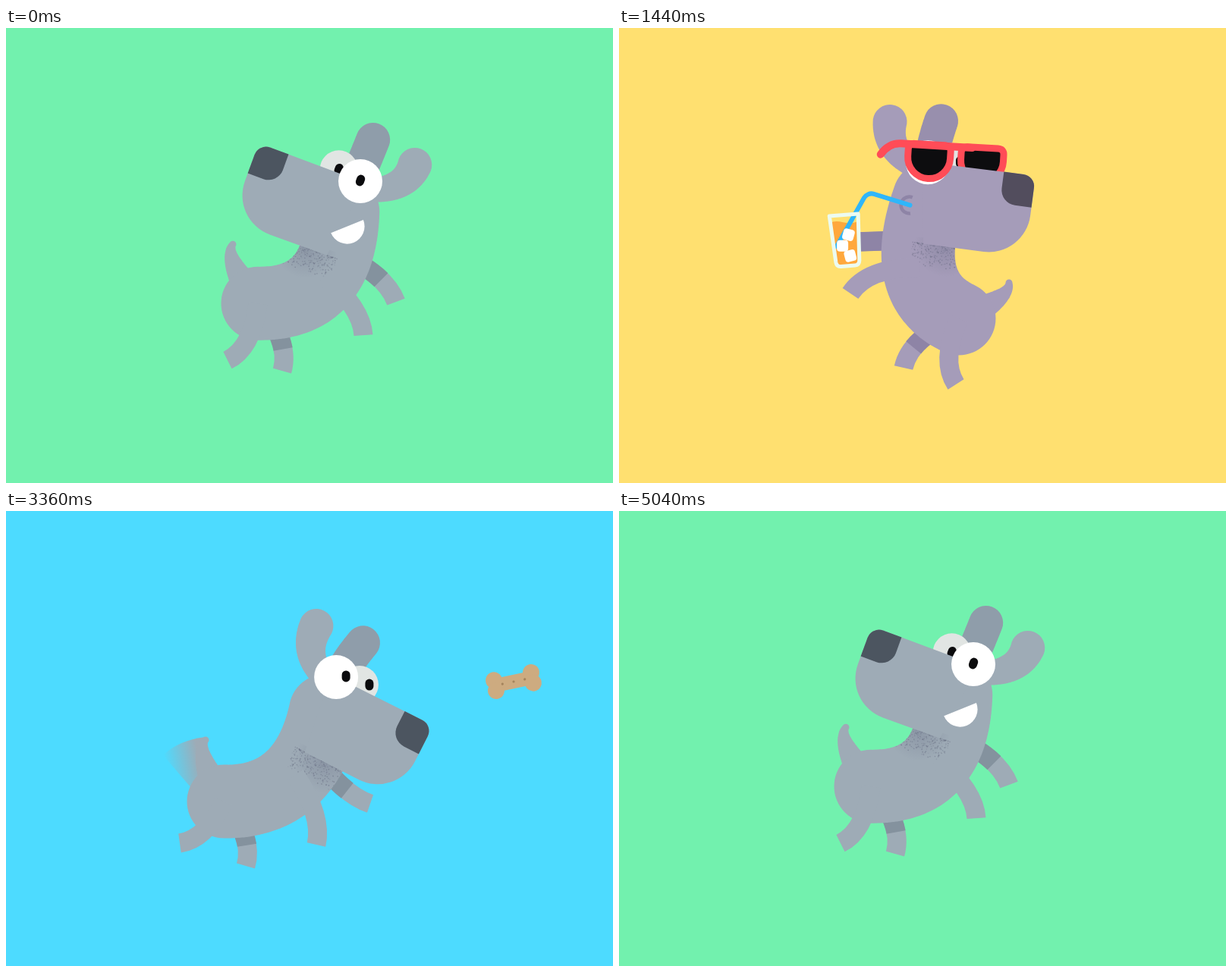
These frames come from a looping animation (800x600 px, 5080 ms). An HTML page with a canvas:

```html
<!DOCTYPE html>
<html lang="en">
<head>
<meta charset="utf-8">
<title>Jumping dogs</title>
<style>
html, body { margin: 0; width: 100%; height: 100%; overflow: hidden; }
canvas { display: block; width: 100vw; height: 100vh; }
</style>
</head>
<body>
<canvas id="stage" width="800" height="600"></canvas>
<script>
const ctx = document.getElementById('stage').getContext('2d');
const LOOP = 5080, STEP = 40, RAD = Math.PI / 180;

// A pose is a nose corner with head tilt, two spine points, a tail tip,
// ear angles, four feet and the bend of the front legs. The rest follows.
const hang = {
  head: [558, 209, 23.5], bend: [350, 295], rump: [398, 382], tail: [486, 377], ears: [-42, 35],
  nearFront: [294, 317], farFront: [313, 245], nearHind: [393, 471], farHind: [328, 445], curl: [.25, 0]
};
const sip = {
  head: [549, 195, 7.5], bend: [366, 345], rump: [448, 383], tail: [514, 336], ears: [-29, 9],
  nearFront: [305, 350], farFront: [314, 282], nearHind: [444, 470], farHind: [375, 448], curl: [.25, 0]
};
const smile = {
  head: [467, 152, -20], bend: [360, 365], rump: [468, 363], tail: [501, 285], ears: [-33, 0],
  nearFront: [329, 405], farFront: [286, 361], nearHind: [508, 438], farHind: [436, 452], curl: [.2, .2]
};
const bored = {
  head: [497, 180, 1.5], bend: [384, 340], rump: [304, 424], tail: [218, 385], ears: [-45, 39],
  nearFront: [443, 368], farFront: [440, 340], nearHind: [289, 512], farHind: [327, 498], curl: [0, .25]
};
const chase = {
  head: [563, 283, 27], bend: [395, 385], rump: [287, 383], tail: [263, 302], ears: [-26, 10],
  nearFront: [409, 440], farFront: [480, 386], nearHind: [229, 438], farHind: [316, 468], curl: [.2, -.15]
};

const purple = { skin: '#a59cb9', dark: '#8e84a6', ear: '#988fad', nose: '#524d5d', rgb: '165,156,185' };
const grey = { skin: '#9eabb6', dark: '#84929e', ear: '#8f9daa', nose: '#4c5560', rgb: '158,171,182' };

// zero: clock time of the top of the jump; show and t0 are seconds from there.
const yellow = { bg: '#ffe070', paint: purple, from: hang, to: sip, zero: 880, show: 0, t0: 0, span: .56,
                 face: -1, cool: true };
const blue = { bg: '#4ddbff', paint: grey, from: bored, to: chase, zero: 2560, show: -.04, t0: 0, span: .8,
               face: 1, rise: 31, bone: true };
const green = { bg: '#72f1ae', paint: grey, from: hang, to: smile, zero: 4200, show: .04, t0: .04, span: .8,
                face: -1, shift: -15, flip: true };
yellow.next = blue; blue.next = green; green.next = yellow;

const clamp = (v, a = 0, b = 1) => Math.max(a, Math.min(b, v));
const mix = (a, b, f) => a.map((v, i) => v + (b[i] - v) * f);
const quad = (a, c, b, s) => mix(mix(a, c, s), mix(c, b, s), s);

let seed = 7;
const rand = () => (seed = seed * 16807 % 2147483647) / 2147483647;
const grain = Array.from({ length: 260 }, () =>
  [-80 - 70 * rand(), 107 + 30 * rand() ** 2, .08 + .3 * rand()]);

function blend(scene, t) {
  const u = Math.max(0, (t - scene.t0) / scene.span);
  const f = u < 1 ? u ** 1.5 : 1 + .5 * (1 - u ** -3);
  const pose = { f };
  for (const k in scene.to) pose[k] = mix(scene.from[k], scene.to[k], f);
  return pose;
}

function fill(color) { ctx.fillStyle = color; ctx.fill(); }
function line(color, width, cap = 'butt') {
  ctx.strokeStyle = color; ctx.lineWidth = width; ctx.lineCap = cap; ctx.lineJoin = 'round';
  ctx.stroke();
}
function disc(x, y, r, color) {
  ctx.beginPath(); ctx.arc(x, y, r, 0, 7); fill(color);
}
function place(x, y, deg, draw) {
  ctx.save(); ctx.translate(x, y); ctx.rotate(deg * RAD); draw(); ctx.restore();
}

// A soft limb along a curve whose radius is a function of the way along it.
function limb(a, c, b, radius) {
  const path = new Path2D();
  for (let i = 0; i <= 48; i++) {
    const [x, y] = quad(a, c, b, i / 48), r = radius(i / 48);
    path.moveTo(x + r, y);
    path.arc(x, y, r, 0, 2 * Math.PI);
  }
  return path;
}
function paintLimb(color, ...shape) {
  ctx.fillStyle = color;
  ctx.fill(limb(...shape));
}

// Point part of the way from a to b, pushed sideways.
function knee([ax, ay], [bx, by], along, side) {
  const dx = bx - ax, dy = by - ay;
  return [ax + dx * along + dy * side, ay + dy * along - dx * side];
}

function leg(hip, foot, side, paint, shade) {
  const c = knee(hip, foot, .65, side);
  ctx.beginPath(); ctx.moveTo(...hip); ctx.quadraticCurveTo(...c, ...foot);
  line(paint.skin, 25);
  if (!shade) return;
  ctx.beginPath(); ctx.moveTo(...hip);
  ctx.quadraticCurveTo(...mix(hip, c, shade), ...quad(hip, c, foot, shade));
  line(paint.dark, 25.5);
}

function tail(rump, tip, face, color) {
  paintLimb(color, rump, knee(rump, tip, .88, .215 * face), tip, s => 4.5 + 18 * (1 - s) ** 1.3);
}

function wag(rump, tip, t, paint) {
  const [x, y] = tip, [rx, ry] = rump;
  const g = ctx.createLinearGradient(x - 8, y + 30, x - 52, y + 38);
  g.addColorStop(0, paint.skin);
  g.addColorStop(1, `rgba(${paint.rgb},0)`);
  ctx.beginPath();
  ctx.moveTo(x, y - 4);
  ctx.quadraticCurveTo(x - 35, y, x - 56, y + 20);
  ctx.lineTo(rx - 43, ry - 18);
  ctx.lineTo(rx - 20, ry - 45);
  fill(g);
  place(rx, ry, -10 * (1 - Math.cos((t - .8) * 40)), () =>
    tail([0, 0], [x - rx, y - ry], 1, paint.skin));
}

function nearEar(deg, color) {
  const x = -172 + 57 * Math.sin(deg * RAD), y = 4 - 57 * Math.cos(deg * RAD);
  paintLimb(color, [-166, 5], [x, -12], [x, y], s => 16 + 6.5 * s);
}
function farEar(deg, color) {
  const x = -140 + 46 * Math.sin(deg * RAD), y = -10 - 46 * Math.cos(deg * RAD);
  paintLimb(color, [-138, -10], [-139, -24], [x, y], () => 22.5);
}

function eye(x, y, r, white, lidColor, look, lid, tilt) {
  disc(x, y, r, white);
  place(x + look[0], y + look[1], tilt, () => {
    ctx.beginPath(); ctx.roundRect(-5.5, -7.5, 11, 15, 5.5); fill('#0b0b0d');
  });
  if (lid <= 0) return;
  ctx.beginPath();
  ctx.arc(x, y, r + .4, (-98 - 88 * lid) * RAD, (-98 + 88 * lid) * RAD);
  fill(lidColor);
}

function lens(x) {
  ctx.beginPath();
  ctx.moveTo(x - 28, -14);
  ctx.quadraticCurveTo(x - 28, -22, x - 20, -22);
  ctx.lineTo(x + 20, -22);
  ctx.quadraticCurveTo(x + 28, -22, x + 28, -14);
  ctx.lineTo(x + 28, -5);
  ctx.ellipse(x, -5, 28, 28, 0, 0, Math.PI);
  ctx.closePath();
  fill('#0d0d0f'); line('#ff4c57', 9);
}
function frontShades() {
  lens(0);
  ctx.beginPath();
  ctx.moveTo(56, -21); ctx.lineTo(-38, -21);
  ctx.quadraticCurveTo(-54, -21, -64, -5);
  line('#ff4c57', 10, 'round');
}

function drink([px, py], tilt, bend, mouth) {
  const x = px - 18, y = py - 38;
  place(x, y, tilt, () => {
    ctx.beginPath();
    ctx.moveTo(-19, 12);
    ctx.bezierCurveTo(-8, 5, 4, 19, 19, 12);
    ctx.lineTo(15, 69); ctx.lineTo(-15, 69);
    fill('#ffa83c');
  });
  ctx.beginPath();
  ctx.moveTo(x - 9, y + 44);
  ctx.arcTo(...bend, ...mouth, 11);
  ctx.lineTo(...mouth);
  line('#2fb6fa', 6, 'round');
  place(x, y, tilt, () => {
    for (let i = 0; i < 3; i++) {
      place(i === 1 ? -5 : 4, 29 + 14 * i, 20 - 15 * i, () => {
        ctx.beginPath(); ctx.roundRect(-7.5, -7.5, 15, 15, 4); fill('#fff');
      });
    }
    ctx.beginPath();
    ctx.moveTo(-19, 2.5); ctx.lineTo(19, 2.5);
    ctx.lineTo(15.5, 64); ctx.quadraticCurveTo(15, 70, 9, 70);
    ctx.lineTo(-9, 70); ctx.quadraticCurveTo(-15, 70, -15.5, 64);
    ctx.closePath();
    line('#ecfbf0', 5);
  });
}

// Streak under something that has just shot up; it sinks and fades.
function trail(points, rgb, age) {
  const k = clamp(1 - age / .2);
  if (!k) return;
  const drop = 180 * (1 - k), g = ctx.createLinearGradient(0, points[0][1] + drop, 0, 640);
  g.addColorStop(0, `rgba(${rgb},${.68 * k})`);
  g.addColorStop(1, `rgba(${rgb},${.22 * k})`);
  ctx.beginPath();
  for (const [x, y] of points) ctx.lineTo(x, y + drop);
  ctx.lineTo(points[points.length - 1][0], 800);
  ctx.lineTo(points[0][0], 800);
  fill(g);
}

function dog(scene, t) {
  const { paint, face } = scene, p = blend(scene, t);
  const [hx, hy, rot] = p.head, c = Math.cos(rot * RAD), s = Math.sin(rot * RAD);
  const at = (x, y) => [hx + x * c - y * s, hy + x * s + y * c];
  const inHead = draw => place(hx, hy, rot, draw);
  const neck = at(-135, 47), spine = k => quad(neck, p.bend, p.rump, k);
  const alert = scene.bone ? clamp((t - .34) / .12) : 0;
  const lid = scene.bone ? 1 - alert : 0;
  const look = scene.bone ? 2 + 11 * alert : scene.cool ? 10 : 0;
  const shades = draw => place(...at(-142, (rot - 9) * .6), rot - 4, draw);
  const tilt = Math.min(rot, 0);

  const [fx, fy] = p.nearFront;
  trail([[p.tail[0] - 4 * face, p.tail[1]], p.rump, spine(.25), [fx + 11 * face, fy - 4]],
    paint.rgb, t - scene.show);

  leg(spine(.25), p.farFront, p.curl[1] * face, paint, scene.cool ? 1 : .6);
  leg(p.rump, p.farHind, .25 * face, paint, .65);
  if (alert) wag(p.rump, p.tail, t, paint); else tail(p.rump, p.tail, face, paint.skin);

  inHead(() => farEar(p.ears[1], paint.ear));
  eye(...at(-111, -4), 25, '#e1e5e3', paint.ear, [look, -4 * lid], lid * .75, tilt);
  if (scene.cool) shades(() => lens(70));

  const body = limb(neck, p.bend, p.rump, () => 48.5);
  ctx.fillStyle = paint.skin;
  ctx.fill(body);
  ctx.save();
  ctx.clip(body);
  inHead(() => {
    const g = ctx.createRadialGradient(-105, 106, 2, -105, 106, 42);
    g.addColorStop(0, 'rgba(95,100,125,.28)');
    g.addColorStop(1, 'rgba(95,100,125,0)');
    ctx.fillStyle = g;
    ctx.fillRect(-170, 100, 110, 55);
    for (const [x, y, a] of grain) {
      ctx.fillStyle = `rgba(80,85,108,${a})`;
      ctx.fillRect(x, y, 1.4, 1.4);
    }
  });
  ctx.restore();

  leg(spine(.45), p.nearFront, p.curl[0] * face, paint);
  leg(p.rump, p.nearHind, .25 * face, paint);
  inHead(() => {
    nearEar(p.ears[0], paint.skin);
    ctx.beginPath();
    ctx.moveTo(-150, 1);
    ctx.lineTo(-16, 0);
    ctx.arcTo(0, 0, 0, 16, 16);
    ctx.lineTo(0, 53);
    ctx.arc(-55, 53, 55, 0, Math.PI / 2);
    ctx.lineTo(-135, 108);
    fill(paint.skin);
    ctx.beginPath(); ctx.roundRect(-42, 0, 42, 42, [0, 16, 0, 20]); fill(paint.nose);
    if (scene.flip) {
      ctx.beginPath(); ctx.arc(-147, 63, 23, 42 * RAD, 222 * RAD); fill('#fff');
    }
    if (scene.cool) {
      ctx.beginPath(); ctx.arc(-160, 60, 11, 75 * RAD, 285 * RAD); line(paint.dark, 4.5);
    }
  });

  eye(...at(-143, 1), 29, '#fff', paint.skin, [look, -1], lid, tilt);
  if (scene.cool) {
    shades(frontShades);
    drink(p.farFront, (rot - 23.5) * .3, at(-217, 50), at(-159, 60));
  }
}

function bone(t) {
  const age = t - .34;
  if (age < 0) return;
  const y = 205 + 20 * clamp(t / .8) ** 3 + 30 * clamp(1 - age / .04);
  trail([[633, y], [707, y]], '205,171,128', age);
  place(669, y, -12 + 18 * (.8 - t), () => {
    const tan = '#cdab80';
    ctx.fillStyle = tan;
    ctx.fillRect(-26, -9, 52, 18);
    for (const x of [-25, 25]) for (const d of [-7, 7]) disc(x, d, 11, tan);
    for (const x of [-15, 0, 15]) disc(x, 0, 1.6, '#a5845c');
  });
}

function sceneAt(ms) {
  if (ms < 440) return [green, .84 + ms / 1000];
  const scene = ms < 2160 ? yellow : ms < 3840 ? blue : green;
  return [scene, (ms - scene.zero) / 1000];
}

function render(ms) {
  const [scene, t] = sceneAt(ms);
  ctx.fillStyle = scene.bg;
  ctx.fillRect(0, 0, 800, 600);
  if (t < scene.show - .001) return;

  ctx.save();
  if (scene.flip) { ctx.translate(800, 0); ctx.scale(-1, 1); }
  const fall = t > .8 ? 79 * ((t - .8) / .24) ** 3.5 : 0;
  const still = Math.max(0, 1 - blend(scene, t).f);
  const lift = (scene.rise || 0) * clamp((t + .04) / .04) * still;
  ctx.translate((scene.shift || 0) * still, fall);
  ctx.save();
  ctx.translate(0, -lift);
  dog(scene, t);
  ctx.restore();
  if (scene.bone) bone(t);
  ctx.restore();

  if (t > 1) {
    ctx.fillStyle = scene.next.bg;
    ctx.fillRect(0, 0, 800, 600 * ((t - 1) / .28) ** 2.75);
  }
}

const begin = performance.now();
function tick() {
  const ms = (performance.now() - begin) % LOOP;
  render(Math.floor(ms / STEP) * STEP);
  requestAnimationFrame(tick);
}
tick();
</script>
</body>
</html>
```
